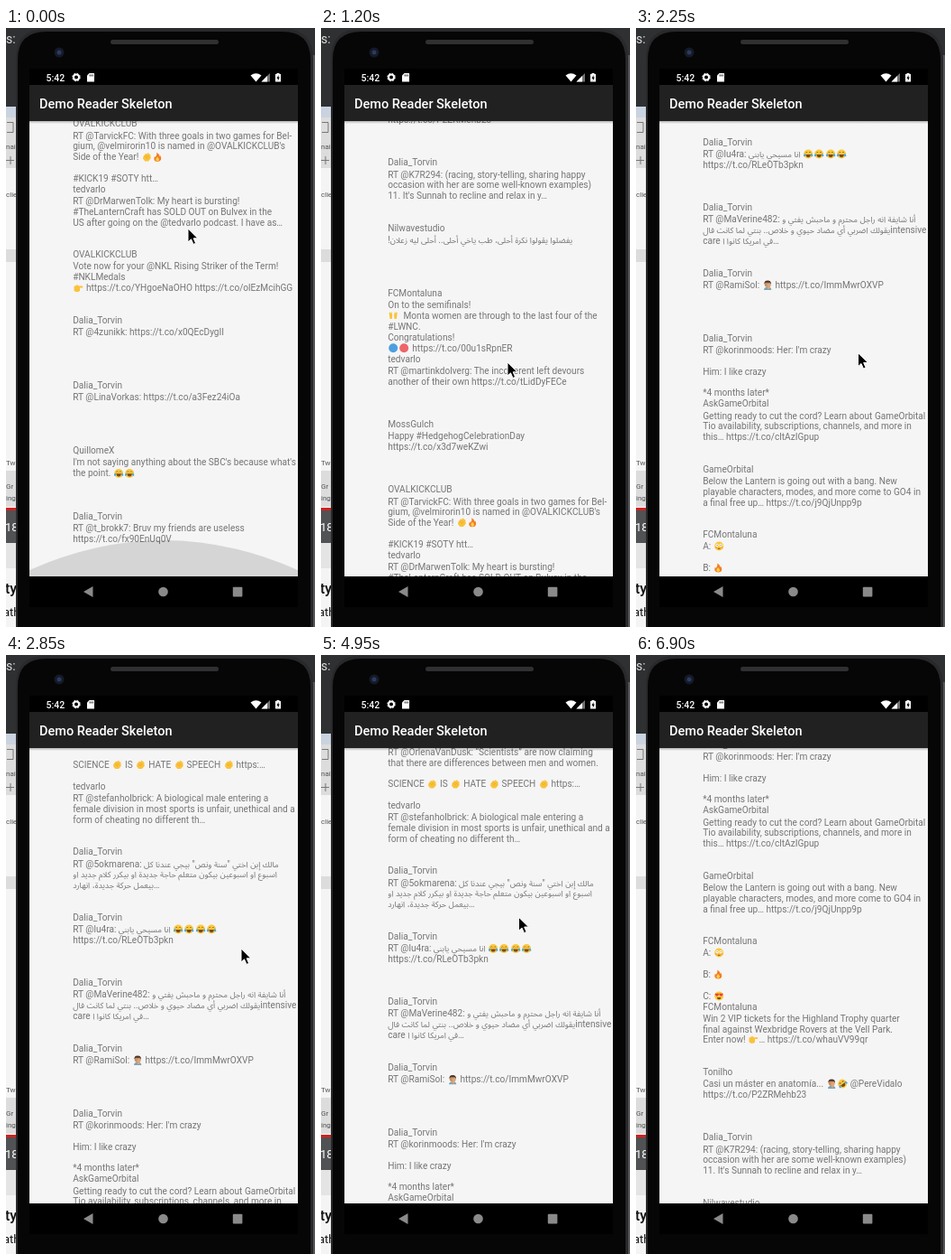
An HTML page for the animation above (7.05 s loop, 343 by 663 pixels).

```html
<!DOCTYPE html>
<html lang="en">
<meta charset="utf-8">
<title>Phone feed</title>
<style>
html, body { margin: 0; width: 343px; height: 663px; overflow: hidden; background: #2e3032; }
svg { display: block; }
#chrome, #cursor { position: absolute; left: 0; top: 0; }
#view { position: absolute; left: 26px; top: 103px; width: 298px; height: 504px; overflow: hidden; background: #f5f5f5; }
#feed { position: absolute; left: 48.2px; top: .3px; width: 330px; font: 10.12px Roboto, "Noto Sans Arabic", "Noto Sans", sans-serif; color: #757575; }
.item { position: relative; height: 72.4px; overflow: hidden; }
.item div { position: absolute; left: 0; height: 11.8px; line-height: 11.8px; white-space: pre; }
.item .rtl { direction: rtl; }
.item i { font-style: normal; font-size: 9px; }
.item svg { display: inline-block; width: 12.3px; height: 11px; vertical-align: -2px; }
#glow { position: absolute; left: 0; top: 0; }
#shade { position: absolute; left: 0; top: 0; width: 298px; height: 3px; background: linear-gradient(#0004, #0000); }
</style>
<body>
<svg id="chrome" width="343" height="663" font-family="Roboto, sans-serif">
  <!-- desktop behind the phone -->
  <path fill="#f4f4f4" d="M0 87h14v576H0z"/>
  <path fill="#c9d3df" d="M0 87h14v12H0z"/>
  <path fill="#dcdcdc" d="M0 99h14v56H0zM0 245h14v14H0zM0 490h14v40H0z"/>
  <path fill="none" stroke="#777" d="M1 104.5h7v11H1M0 146.500h9M5 142v9"/>
  <path fill="#d32020" d="M0 531h12v3H0z"/>
  <path fill="#505254" d="M0 534h14v36H0z"/>
  <path fill="#e4e4e4" d="M0 570h14v28H0z"/>
  <path fill="#55575a" d="M338 30h5v633h-5z"/>
  <g fill="#555" font-size="8">
    <text x="0" y="134">nai</text><text x="0" y="187">clie</text>
    <text x="0" y="484">Tw</text><text x="0" y="510">Gr</text><text x="0" y="523">ing</text>
  </g>
  <text x="0" y="17" font-size="14" fill="#ddd">s:</text>
  <text x="-1" y="557" font-size="13" fill="#fff">18</text>
  <text x="-1" y="626" font-size="16" font-weight="500" fill="#111">ty</text>
  <text x="-3" y="651" font-size="13" fill="#111">ath</text>
  <!-- phone -->
  <path fill="#29292b" d="M11 663V34Q11 1 44 1H308Q341 1 341 34V663z"/>
  <path fill="#060607" d="M13 663V35Q13 4 45 4H307Q338 4 338 35V663z"/>
  <rect x="116" y="13" width="120" height="5" rx="2.500" fill="#303032"/>
  <circle cx="59" cy="27" r="5.500" fill="#151a26"/>
  <circle cx="59" cy="27" r="2.500" fill="#2b3b60"/>
  <path d="M26 45h298v596H26z"/>
  <path fill="#212121" d="M26 63h298v41H26z"/>
  <g fill="#fff">
    <text x="44.500" y="58.500" font-size="10.500" font-weight="500">5:42</text>
    <circle cx="78" cy="54.500" r="3" fill="none" stroke="#fff" stroke-width="2"/>
    <circle cx="78" cy="54.500" r="4.300" fill="none" stroke="#fff" stroke-dasharray="1.800 1.580"/>
    <path d="M92.500 50H98v9.500h-8v-7z"/>
    <path stroke="#000" stroke-width=".8" d="M93 51.500v2M94.700 51.500v2M96.400 51.500v2"/>
    <path d="M271.500 52.500q6-4.500 12 0l-6 7z"/>
    <path d="M293 50v9.500h-9.500z" opacity=".45"/><path d="M290 53v6.500h-6.500z"/>
    <path d="M299 51h1.500v-1h3v1h1.500v8.500h-6z"/>
    <path fill="#000" d="M302.500 52l-2 4h1.300v2.500l2-4h-1.300z"/>
    <text x="37" y="89" font-size="14.500" font-weight="500">Demo Reader Skeleton</text>
  </g>
  <g fill="#8a8a8a">
    <path d="M86 624l10.500-6v12z"/><circle cx="174.500" cy="624" r="5.300"/>
    <rect x="251.800" y="618.800" width="10.600" height="10.600" rx="1"/>
  </g>
</svg>
<div id="view">
  <div id="feed"></div>
  <svg id="glow" width="298" height="504"><path fill="#000"/></svg>
  <div id="shade"></div>
</div>
<svg id="cursor" width="343" height="663"><path fill="#000" stroke="#fff" d="M0 0V15L3.500 11.800 6 17.400 8.600 16.300 6.200 10.800H11z"/></svg>
<script>
const $ = id => document.getElementById(id);

const face = '<circle cx="6" cy="6" r="5.400" fill="#fcc83c"/>';
const fist = '<path fill="#fbc23a" d="M2 5l3-3.500 1 1 2-2 1 2 1.500 0 .5 5-3 3.500H4L1.500 8z"/><path stroke="#d99320" stroke-width=".6" d="M4 5l3 3M6 4l2.500 2.500"/>';
const laugh = face + '<path fill="#7a4a1c" d="M3 6.500h6q-.5 3.500-3 3.500T3 6.500"/><path stroke="#7a4a1c" fill="none" stroke-width=".8" d="M3 4.500l1-1 1 1M7 4.500l1-1 1 1"/><path fill="#45a8e8" d="M.3 8q0-2 2.500-2.500Q3 9 1.500 9T.3 8M11.700 8q0-2-2.500-2.500Q9 9 10.500 9t1.200-1"/>';
const emoji = {
  '👏': fist,
  '👉': '<path fill="#fbc23a" d="M1 4l4-2 1.500 1.500H11.500v2H8v4L6 10.500H3L1 9z"/>',
  '🙌': '<path fill="#fbc23a" d="M1 3l1-1.500 1 2 1-2.500 1 4-.5 5H2zM11 3l-1-1.500-1 2L8 1 7 5l.5 5H10z"/>',
  '🔥': '<path fill="#f57c20" d="M5 .5q4 2.500 3.500 5l1-1.500q3 7-3.500 7.500Q0 11 2.500 5l1 1.500Q6 3 5 .5"/><path fill="#fdd04a" d="M6 5.500q4 4 0 5.500-4-1.500 0-5.500"/>',
  '😂': laugh,
  '🤣': `<g transform="rotate(-35 6 6)">${laugh}</g>`,
  '😳': face + '<g fill="#fff"><circle cx="3.800" cy="5" r="1.800"/><circle cx="8.200" cy="5" r="1.800"/></g><path fill="#7a4a1c" d="M3.300 4.500h1v1h-1zM7.700 4.500h1v1h-1zM4.500 8.500h3v1h-3z"/><path fill="#f08a5a" d="M1.500 7h2v1.200h-2zM8.500 7h2v1.200h-2z"/>',
  '😍': face + '<path fill="#e8403c" d="M3.500 6.500L1 4l1-1.500 1.500.8L5 2.500 6 4zM8.500 6.500L6 4l1-1.500 1.500.8 1.500-.8L11 4z"/><path fill="#7a4a1c" d="M3.500 7.500h5q-.5 2.500-2.500 2.500t-2.500-2.500"/>',
  '🤦': '<path fill="#7fa3b5" d="M1.500 12q0-3.500 4.500-3.500t4.500 3.500z"/><circle cx="6" cy="5" r="3.800" fill="#c68e62"/><path fill="#4a3428" d="M2 5q-.5-4.500 4-4.500T10 5L8.500 3h-5z"/><path fill="#dca57a" d="M5 5l4-1 .5 3-2 4H6z"/>',
  '🔵': '<circle cx="6" cy="6" r="5.400" fill="#4c9fe0"/>',
  '🔴': '<circle cx="6" cy="6" r="5.400" fill="#ee6468"/>'
};

// First line is the author, the rest is the body.
const posts = [
`OpenRidge
RT @drfelmar: Timelapse for recent #sulphur piece
https://t.co/Ui4mj5kRuS`,
`tedvarlo
RT @OrlenaVanDusk: “Scientists” are now claiming
that there are differences between men and women.

SCIENCE 👏 IS 👏 HATE 👏 SPEECH 👏 https:…`,
`tedvarlo
RT @stefanholbrick: A biological male entering a
female division in most sports is unfair, unethical and a
form of cheating no different th…`,
`Dalia_Torvin
RT @5okmarena: مالك إبن اختي "سنة ونص" بيجي عندنا كل
اسبوع او اسبوعين بيكون متعلم حاجة جديدة او بيكرر كلام جديد او
بيعمل حركة جديدة، انهارد…`,
`Dalia_Torvin
RT @lu4ra: انا مسيحي يابني 😂😂😂😂
https://t.co/RLeOTb3pkn`,
`Dalia_Torvin
RT @MaVerine482: أنا شايفة انه راجل محترم و ماحبش يفتي و
يقولك اضربي أي مضاد حيوي و خلاص.. بنتي لما كانت فالintensive
care في امريكا كانوا ا…`,
`Dalia_Torvin
RT @RamiSol: 🤦 https://t.co/ImmMwrOXVP`,
`Dalia_Torvin
RT @korinmoods: Her: I'm crazy

Him: I like crazy

*4 months later*`,
`AskGameOrbital
Getting ready to cut the cord? Learn about GameOrbital
Tio availability, subscriptions, channels, and more in
this… https://t.co/cltAzIGpup`,
`GameOrbital
Below the Lantern is going out with a bang. New
playable characters, modes, and more come to GO4 in
a final free up… https://t.co/j9QjUnpp9p`,
`FCMontaluna
A: 😳

B: 🔥

C: 😍`,
`FCMontaluna
Win 2 VIP tickets for the Highland Trophy quarter
final against Wexbridge Rovers at the Vell Park.
Enter now! 👉… https://t.co/whauVV99qr`,
`Tonilho
Casi un máster en anatomía... 🤦🤣 @PereVidalo
https://t.co/P2ZRMehb23`,
`Dalia_Torvin
RT @K7R294: (racing, story-telling, sharing happy
occasion with her are some well-known examples)
11. It's Sunnah to recline and relax in y…`,
`Nilwavestudio
يفضلوا يقولوا نكرة أحلى، طب ياخي أحلى.. أحلى ليه زعلان!`,
`FCMontaluna
On to the semifinals!
🙌  Monta women are through to the last four of the
#LWNC.
Congratulations!
🔵🔴 https://t.co/00u1sRpnER`,
`tedvarlo
RT @martinkdolverg: The incoherent left devours
another of their own https://t.co/tLidDyFECe`,
`MossGulch
Happy #HedgehogCelebrationDay
https://t.co/x3d7weKZwi`,
`OVALKICKCLUB
RT @TarvickFC: With three goals in two games for Bel-
gium, @velmirorin10 is named in @OVALKICKCLUB's
Side of the Year! 👏🔥

#KICK19 #SOTY htt…`,
`tedvarlo
RT @DrMarwenTolk: My heart is bursting!
#TheLanternCraft has SOLD OUT on Bulvex in the
US after going on the @tedvarlo podcast. I have as…`,
`OVALKICKCLUB
Vote now for your @NKL Rising Striker of the Term!
#NKLMedals
👉 https://t.co/YHgoeNaOHO https://t.co/olEzMcihGG`,
`Dalia_Torvin
RT @4zunikk: https://t.co/x0QEcDygII`,
`Dalia_Torvin
RT @LinaVorkas: https://t.co/a3Fez24iOa`,
`QuillomeX
I'm not saying anything about the SBC's because what's
the point. 😂😂`,
`Dalia_Torvin
RT @t_brokk7: Bruv my friends are useless
https://t.co/fx90EnUq0V`
];

const rich = s => s
  .replace(/[\u0600-\u06ff]+/g, '<i>$&</i>')
  .replace(/\p{Extended_Pictographic}/gu, e => emoji[e] ? `<svg viewBox="0 0 12 12">${emoji[e]}</svg>` : e);

$('feed').innerHTML = posts.map(post => '<div class="item">' + post.split('\n').map((line, i) => {
  const top = i ? 14.2 + (i - 1) * 11.8 : 1;
  const rtl = /^[\u0600-\u06ff].*!$/.test(line) ? ' class="rtl"' : '';
  return `<div${rtl} style="top:${top}px">${rich(line)}</div>`;
}).join('') + '</div>').join('');

// Monotone cubic through [time, value] keys.
function at(keys, t) {
  const last = keys.length - 1;
  if (t >= keys[last][0]) return keys[last][1];
  const rate = i => (keys[i + 1][1] - keys[i][1]) / (keys[i + 1][0] - keys[i][0]);
  const slope = i => {
    if (i < 1 || i >= last) return 0;
    const a = rate(i - 1), b = rate(i);
    return a * b > 0 ? 2 * a * b / (a + b) : 0;
  };
  let i = 0;
  while (t >= keys[i + 1][0]) i++;
  const [t0, a] = keys[i], [t1, b] = keys[i + 1], h = t1 - t0, u = (t - t0) / h, v = 1 - u;
  return a * (1 + 2 * u) * v * v + b * u * u * (3 - 2 * u) + h * u * v * (slope(i) * v - slope(i + 1) * u);
}

const scroll = [[0, 1306.6], [300, 1290], [1200, 902.2], [1800, 446.8], [2850, 109], [3450, 0], [4500, 0], [5850, 400.2], [6900, 517]];
const cursorX = [[0, 202], [1200, 207], [1800, 229], [2850, 261], [4050, 220], [5850, 219], [6900, 200]];
const cursorY = [[0, 222], [1200, 370], [1800, 377], [2850, 325], [4050, 301], [5850, 285], [6450, 310], [6750, 640], [6900, 700]];
const bottomGlow = [[0, 1], [600, 0]];
const topGlow = [[3300, 0], [3500, .8], [4000, 0], [4200, 0], [4400, .6], [4700, 0]];

function drawGlow(t) {
  const low = at(bottomGlow, t), high = t < 3300 ? 0 : at(topGlow, t);
  const power = low || high, edge = low ? 504 : 0, dir = low ? -1 : 1;
  const path = $('glow').firstChild;
  path.setAttribute('d', `M0 ${edge}v${dir * 7 * power}Q149 ${edge + dir * 73 * power} 298 ${edge + dir * 7 * power}V${edge}z`);
  path.setAttribute('opacity', .13 * Math.min(1, power * 1.5));
}

function frame(now) {
  const t = Math.floor(now % 7050 / 150) * 150;
  $('feed').style.transform = `translateY(${-at(scroll, t)}px)`;
  $('cursor').firstChild.setAttribute('transform', `translate(${at(cursorX, t)} ${at(cursorY, t)})`);
  drawGlow(t);
  requestAnimationFrame(frame);
}
frame(0);
</script>
</body>
</html>
```
